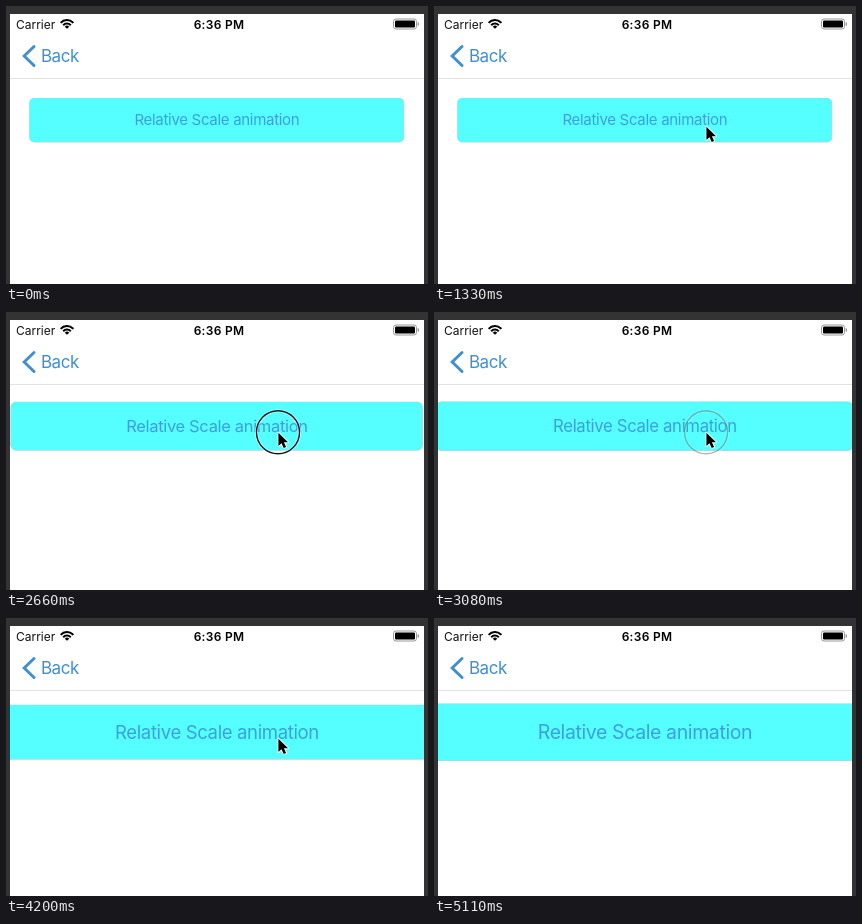
Write an HTML page with a canvas that moves like this. It is 422x278 px and loops after 5.39 s.

```html
<!DOCTYPE html>
<html lang="en">
<head>
<meta charset="utf-8">
<title>Relative Scale animation</title>
<style>
  html, body { margin: 0; width: 100%; height: 100%; overflow: hidden; background: #333; }
  canvas { display: block; width: 422px; height: 278px; }
</style>
</head>
<body>
<canvas id="stage"></canvas>
<script>
const W = 422, H = 278, LOOP = 5390, STEP = 70, LAST = 5110;
const FONT = 'Inter, Roboto, "Liberation Sans", sans-serif';
const BLUE = '#428fd0';
const REST = [272.4, 120.8];

const canvas = document.getElementById('stage');
const ctx = canvas.getContext('2d');
const dpr = window.devicePixelRatio || 1;
canvas.width = W * dpr;
canvas.height = H * dpr;

// Each tap shows a ring while pressed, then grows the button by 0.1.
const TAPS = [
  { down: 1400, up: 1680 },
  { down: 2660, up: 3010 },
  { down: 3710, up: 4077 }
];
const GROW = 300, FADE = 100;

// Pointer stops: time, x, y
const ENTER = [[420, 387, 217], [770, 258, 123], [910, 271, 121], [1120, ...REST]];
const LEAVE = [[4480, ...REST], [5040, 234.5, 270]];

const clamp = v => Math.max(0, Math.min(1, v));
const mix = (a, b, p) => a + (b - a) * p;
const easeOut = p => 1 - (1 - p) * (1 - p);
const easeInOut = p => p * p * (3 - 2 * p);

function along(stops, t, ease) {
  for (let i = 1; i < stops.length; i++) {
    const [t0, x0, y0] = stops[i - 1], [t1, x1, y1] = stops[i];
    if (t <= t1) {
      const p = ease(clamp((t - t0) / (t1 - t0)));
      return [mix(x0, x1, p), mix(y0, y1, p)];
    }
  }
  return stops[stops.length - 1].slice(1);
}

function pointerAt(t) {
  if (t < 420 || t >= LAST) return null;
  return t < LEAVE[0][0] ? along(ENTER, t, easeOut) : along(LEAVE, t, easeInOut);
}

function scaleAt(t) {
  return TAPS.reduce((s, tap) => s + 0.1 * easeInOut(clamp((t - tap.up) / GROW)), 1);
}

function ringAt(t) {
  const tap = TAPS.find(k => t >= k.down && t < k.up + FADE);
  return tap ? 1 - clamp((t - tap.up) / FADE) : 0;
}

function box(x, y, w, h, r, color) {
  ctx.beginPath();
  ctx.roundRect(x, y, w, h, r);
  ctx.fillStyle = color;
  ctx.fill();
}

function text(str, x, y, size, color, { weight = 400, align = 'left', spacing = 0 } = {}) {
  ctx.font = `${weight} ${size}px ${FONT}`;
  ctx.letterSpacing = spacing + 'px';
  ctx.textAlign = align;
  ctx.fillStyle = color;
  ctx.fillText(str, x, y);
}

function wifi(x, y) {
  ctx.strokeStyle = ctx.fillStyle = '#000';
  ctx.lineCap = 'butt';
  ctx.lineWidth = 2;
  for (const r of [5.2, 8.7]) {
    ctx.beginPath();
    ctx.arc(x, y, r, -Math.PI * 0.76, -Math.PI * 0.24);
    ctx.stroke();
  }
  ctx.beginPath();
  ctx.moveTo(x, y);
  ctx.arc(x, y, 3, -Math.PI * 0.76, -Math.PI * 0.24);
  ctx.fill();
}

function battery() {
  ctx.beginPath();
  ctx.roundRect(387.5, 13, 23, 10, 2.5);
  ctx.strokeStyle = '#999';
  ctx.lineWidth = 1;
  ctx.stroke();
  box(389, 14.5, 20, 7, 1.2, '#000');
  box(411.6, 16.3, 1.4, 3.4, [0, 1, 1, 0], '#999');
}

function navBar() {
  text('Carrier', 10, 22.5, 12, '#111');
  wifi(61, 22.8);
  text('6:36 PM', 213, 22.5, 12, '#000', { weight: 600, align: 'center', spacing: 0.3 });
  battery();

  ctx.beginPath();
  ctx.moveTo(28, 40.5);
  ctx.lineTo(18.2, 50);
  ctx.lineTo(28, 59.5);
  ctx.strokeStyle = BLUE;
  ctx.lineWidth = 3;
  ctx.lineCap = 'round';
  ctx.lineJoin = 'miter';
  ctx.stroke();
  text('Back', 35, 56, 17, BLUE, { spacing: -0.5 });

  ctx.fillStyle = '#e2e2e2';
  ctx.fillRect(4, 72, 414, 1);
}

function button(scale) {
  ctx.save();
  ctx.translate(210.7, 114);
  ctx.scale(scale, scale);
  box(-187.5, -22, 375, 44.4, 5, '#b4d4d8');
  box(-187.2, -21.8, 374, 43.6, 4.5, '#55ffff');
  text('Relative Scale animation', 0.2, 5.4, 15, '#3c9fe0', { align: 'center', spacing: -0.3 });
  ctx.restore();
}

function circle(x, y, r, color, width) {
  ctx.beginPath();
  ctx.arc(x, y, r, 0, Math.PI * 2);
  ctx.strokeStyle = color;
  ctx.lineWidth = width;
  ctx.stroke();
}

function ring(alpha) {
  ctx.save();
  ctx.globalAlpha = alpha;
  circle(272, 120.3, 21.5, 'rgba(255,255,255,0.6)', 3);
  circle(272, 120.3, 21.5, '#101820', 1.4);
  ctx.restore();
}

const ARROW = new Path2D('M0 0V13.2L3.1 10.4L5.3 15.2L7.7 14.2L5.5 9.5H9.7Z');

function pointer([x, y]) {
  ctx.save();
  ctx.translate(x, y);
  ctx.lineJoin = 'round';
  ctx.lineWidth = 1.8;
  ctx.strokeStyle = '#fff';
  ctx.stroke(ARROW);
  ctx.fillStyle = '#000';
  ctx.fill(ARROW);
  ctx.restore();
}

function draw(t) {
  ctx.setTransform(dpr, 0, 0, dpr, 0, 0);
  ctx.fillStyle = '#333';
  ctx.fillRect(0, 0, W, H);

  ctx.save();
  ctx.beginPath();
  ctx.rect(4, 8, 414, 270);
  ctx.clip();
  ctx.fillStyle = '#fff';
  ctx.fillRect(4, 8, 414, 270);
  navBar();
  button(scaleAt(t));
  ctx.restore();

  const alpha = ringAt(t);
  if (alpha > 0) ring(alpha);
  const spot = pointerAt(t);
  if (spot) pointer(spot);
}

function frame() {
  const t = performance.now() % LOOP;
  draw(Math.min(LAST, Math.floor(t / STEP) * STEP));
  requestAnimationFrame(frame);
}
frame();
</script>
</body>
</html>
```
